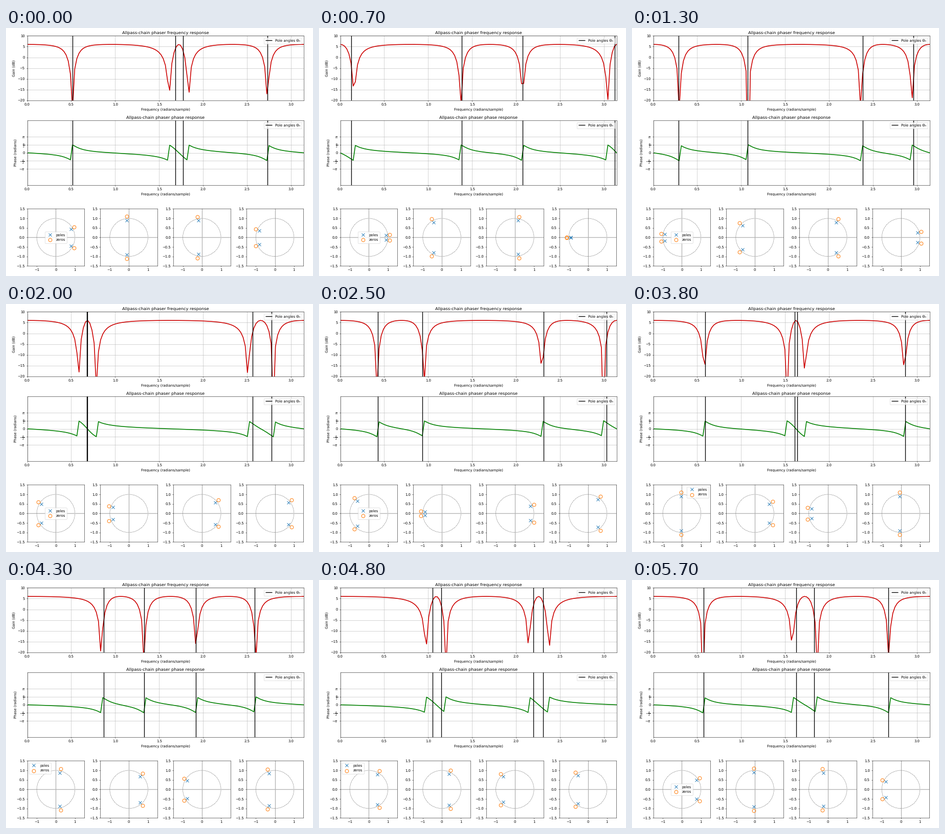
These frames come from a looping animation (600 px wide and 486 px high, 5800 ms). A matplotlib script:

```python
import numpy as np
import matplotlib.pyplot as plt
from matplotlib.animation import FuncAnimation
from matplotlib.lines import Line2D
from matplotlib.patches import Circle

W, H, DPI = 600, 486, 48
FRAMES, INTERVAL = 58, 100
SWEEP_STEPS = 112  # the sweep moves on a finer grid than the frames
RADIUS = 0.9
START = np.array([0.516, 1.682, 1.773, 2.730])
DIRECTION = np.array([-1, 1, -1, 1])

plt.rcParams.update({
    "font.family": "DejaVu Sans",
    "font.size": 10.25,
    "text.hinting": "none",
    "lines.linewidth": 1.5,
})

fig = plt.figure(figsize=(W / DPI, H / DPI), dpi=DPI, facecolor="white")
omega = np.linspace(0, np.pi, 129)


def pole_angles(i):
    step = round(i * SWEEP_STEPS / FRAMES)
    return (START + DIRECTION * step * np.pi / SWEEP_STEPS) % np.pi


def response(angles):
    """Dry signal plus a chain of second-order allpass sections."""
    z1 = np.exp(-1j * omega)
    chain = np.ones_like(z1)
    for c in 2 * RADIUS * np.cos(angles):
        chain *= (RADIUS**2 - c * z1 + z1**2) / (1 - c * z1 + RADIUS**2 * z1**2)
    return 1 + chain


def pixel_axes(x, y, w, h):
    return fig.add_axes([x / W, 1 - (y + h) / H, w / W, h / H])


def response_plot(y, title, ylabel, ylim, color):
    ax = pixel_axes(41.5, y, 540, 126.3)
    ax.set(xlim=(0, np.pi), ylim=ylim, ylabel=ylabel,
           xlabel="Frequency (radians/sample)")
    ax.set_title(title, fontsize=12.3)
    ax.grid(True)
    curve, = ax.plot([], [], color=color, lw=2.4)
    poles = ax.vlines(START, *ylim, color="black", lw=2,
                      label="Pole angles Θₙ")
    ax.legend(handles=[poles], loc="upper right")
    return curve, poles


def pole_zero_plot(x):
    ax = pixel_axes(x, 354.4, 111.8, 112)
    ax.add_patch(Circle((0, 0), 1, fill=False, color="black", ls="dotted", lw=1))
    ax.axhline(0, color="0.7", lw=2)
    ax.axvline(0, color="0.7", lw=2)
    poles, = ax.plot([], [], "x", ms=9.5, mew=1.4, color="C0", label="poles")
    zeros, = ax.plot([], [], "o", ms=10, mew=1.5, color="C1",
                     fillstyle="none", label="zeros")
    ax.set(xlim=(-1.5, 1.5), ylim=(-1.5, 1.5),
           xticks=[-1, 0, 1], yticks=np.arange(-1.5, 1.6, 0.5))
    return poles, zeros


gain, gain_poles = response_plot(
    15.4, "Allpass-chain phaser frequency response", "Gain (dB)",
    (-20, 10), "#cc0000")
phase, phase_poles = response_plot(
    181.4, "Allpass-chain phaser phase response", "Phase (radians)",
    (-2 * np.pi, 2 * np.pi), "green")
phase.axes.set_yticks(
    np.pi * np.array([-1, -0.5, 0, 0.5, 1]),
    [r"$-\pi$", r"$-\frac{\pi}{2}$", "0", r"$\frac{\pi}{2}$", r"$\pi$"])

sections = [pole_zero_plot(41.5 + 142.7 * k) for k in range(4)]
sections[0][0].axes.legend(loc="best")

fig.add_artist(Line2D([0, 1], [0.5 / H] * 2, color="0.6", lw=1.5))


def update(i):
    angles = pole_angles(i)
    h = response(angles)
    gain.set_data(omega, 20 * np.log10(np.abs(h) + 1e-9))
    phase.set_data(omega, np.angle(h))
    for lines in (gain_poles, phase_poles):
        low, high = lines.axes.get_ylim()
        lines.set_segments([[(a, low), (a, high)] for a in angles])
    for (poles, zeros), a in zip(sections, angles):
        pair = np.exp(1j * np.array([a, -a]))
        poles.set_data(RADIUS * pair.real, RADIUS * pair.imag)
        zeros.set_data(pair.real / RADIUS, pair.imag / RADIUS)
    return []


anim = FuncAnimation(fig, update, frames=FRAMES, interval=INTERVAL, repeat=True)
plt.show()
```
